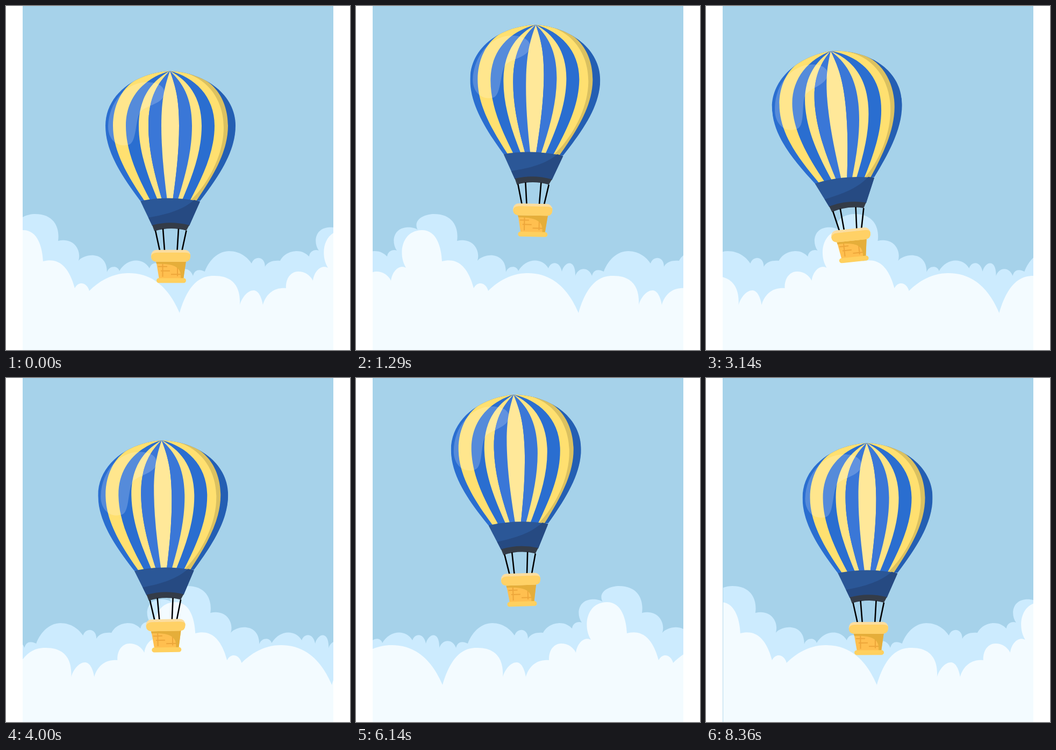
These frames come from a looping animation (640x640 px, 8430 ms). An HTML page:

```html
<!DOCTYPE html>
<html lang="en">
<head>
<meta charset="utf-8">
<title>Hot air balloon</title>
<style>
  html, body { margin: 0; height: 100%; overflow: hidden; background: #fff; }
  svg { display: block; width: 100%; height: 100%; }
</style>
</head>
<body>
<svg viewBox="0 0 640 640">
  <defs>
    <clipPath id="stage"><rect x="31" width="578" height="640"/></clipPath>
    <clipPath id="hull"><path id="hullShape"/></clipPath>
    <path id="back" fill="#ccebfe" d="M369 494C378 470 396 456 414 456C434 456 448 467 456 479C461 464 481 465 481 485
      C486 475 498 473 509 474C517 459 532 456 540 456C551 456 558 461 563 466C564 456 574 452 581 455
      C571 441 573 415 598 412C607 411 615 413 619.5 416C610 396 635 387 650 387C690 387 696 418 693 437
      C722 430 737 454 731 474C742 460 784 455 784 495C788 483 804 482 807 493C820 470 850 466 863 488
      C867 475 884 473 888 494C893 474 914 470 913 502C919 485 938 485 944 502C947 490 956 489 966 494V650H300Z"/>
    <path id="front" fill="#f3fbff" d="M322 571C338 515 362 502 385 502C424 501 436 526 434 556C439 540 450 529 460 529
      C469 529 475 543 477 556C482 538 496 523 520 525C519 507 529 494 543 494C556 494 566 502 570 511
      C573 492 586 481 598 487C583 463 589 418 627 417C655 416 664 449 665 475C703 465 717 500 724 525
      C733 509 748 517 751 530C774 507 800 497 823 497C880 496 906 541 919 571V650H290Z"/>
  </defs>
  <g clip-path="url(#stage)">
    <rect width="640" height="640" fill="#a6d2ea"/>
    <g id="clouds"></g>
    <g id="balloon">
      <g clip-path="url(#hull)">
        <rect x="180" y="110" width="250" height="260" fill="#2a6ed0"/>
        <g id="stripes"></g>
        <path fill="#000" opacity=".14" d="M309 119C370 124 405 170 405 225C405 280 372 335 342 362L440 370V110Z"/>
        <path fill="#fff" opacity=".2" d="M190 222C192 176 225 141 262 141C285 141 297 151 295 164C289 182 262 184 251 195
          C240 207 244 252 229 257C205 264 189 245 190 222Z"/>
      </g>
      <path fill="#2b5797" d="M250 362Q305 351 361 363L341 408H272Z"/>
      <path fill="#264a82" d="M265 393C300 387 330 378 350 360L361 363L341 408H272Z"/>
      <path fill="#343c48" d="M272 407Q306 398 341 407L335.500 417Q306 409 276 418Z"/>
      <path stroke="#000" stroke-width="2.6" d="M278 417L286 454M292 413.500L295 454M321 413.500L318.500 454M335.500 417L327.500 454"/>
      <path fill="#ffbf4f" d="M279 472H335L330 508H285Z"/>
      <path fill="none" stroke="#eda63a" stroke-width="2" d="M283 484H300M288 492H305M307 498.500H327M291.500 478V503M319 486V502"/>
      <path fill="#e5ae3a" d="M279 474H335L330 507H325C327 488 318 478 280 479Z"/>
      <rect x="270" y="453" width="73" height="22" rx="10" fill="#fbdda0"/>
      <path fill="#ffd166" d="M270 465Q272 458 281 458H333Q341 458 343 462V465Q343 475 333 475H281Q270 475 270 465Z"/>
      <rect x="280" y="505.500" width="55" height="9" rx="4.500" fill="#ffd05f"/>
    </g>
  </g>
</svg>
<script>
const FPS = 14, LOOP = 8430, TILE = 597;
const $ = id => document.getElementById(id);

// One side of a stripe: from the apex over the widest point down to the skirt.
// Inner stripes leave the apex more steeply.
const side = (wide, low) => {
  const steep = 1 - Math.abs(wide - 305) / 120;
  return [
    [305, 120], [305 + (wide - 305) * .55, 124 + 26 * steep], [wide, 165 + 5 * steep], [wide, 222],
    [wide, 270], [wide + (low - wide) * .47, 316], [low, 362]
  ];
};
const panel = (left, right) => {
  const curve = p => `C${p.slice(1, 4)}C${p.slice(4)}`;
  return `M${left[0]}${curve(left)}L${right[6]}${curve([...right].reverse())}Z`;
};
$('hullShape').setAttribute('d', panel(side(185, 250), side(427, 361)));

const outer = (wide, low, top) => {
  const p = side(wide, low);
  p[1] = [top, 120];
  p[2] = [wide, 175];
  return p;
};
const stripes = [
  ['#ffe070', outer(199, 258, 225), side(223, 269)],
  ['#ffe484', side(247, 283), side(265, 291)],
  ['#3a77d7', side(265, 291), side(289, 300)],
  ['#ffe899', side(289, 300), side(322, 310)],
  ['#3a77d7', side(322, 310), side(346, 319)],
  ['#ffe484', side(346, 319), side(364, 327)],
  ['#ffe070', side(388, 342), outer(413, 354, 387)]
];
$('stripes').innerHTML = stripes.map(([fill, l, r]) => `<path fill="${fill}" d="${panel(l, r)}"/>`).join('');

const row = id => [-2, -1, 0].map(k => `<use href="#${id}" x="${k * TILE}"/>`).join('');
// The cloud strip ends where the sky rectangle begins
$('clouds').innerHTML = row('back') + row('front') +
  '<rect x="-640" y="380" width="79" height="270" fill="#a6d2ea"/>';

// Flight path: step, apex x, apex y, tilt in degrees
const keys = [
  [0, 305, 121, 0], [6, 348, 97, 2.7], [12, 368, 52, 4.8], [18, 334.5, 35, 1.2],
  [24, 298, 30, -1.6], [36, 239, 48, -6.4], [44, 232, 84, -6], [56, 289.5, 116, -1],
  [60, 312, 118, .4], [66, 352, 95, 3], [72, 370, 55, 5], [84, 304, 32, -1],
  [96, 242, 35, -6.3], [99, 236, 44, -6.7], [108, 246, 89, -5], [117, 299, 121, -.3]
];
const STEPS = 118, n = keys.length;
const key = i => {
  const lap = Math.floor(i / n), k = keys[i - lap * n];
  return [k[0] + lap * STEPS, ...k.slice(1)];
};

function pose(step) {
  let i = n - 1;
  while (keys[i][0] > step) i--;
  const [p, a, b, q] = [-1, 0, 1, 2].map(d => key(i + d));
  const span = b[0] - a[0], u = (step - a[0]) / span;
  return [1, 2, 3].map(c => {
    const ma = (b[c] - p[c]) / (b[0] - p[0]) * span;
    const mb = (q[c] - a[c]) / (q[0] - a[0]) * span;
    const d = b[c] - a[c];
    return a[c] + u * (ma + u * (3 * d - 2 * ma - mb + u * (ma + mb - 2 * d)));
  });
}

function draw(now) {
  const step = Math.min(STEPS - 1, Math.floor(now % LOOP * FPS / 1000 + .1));
  const [x, y, tilt] = pose(step);
  $('clouds').setAttribute('transform', `translate(${.9 + step * TILE / STEPS})`);
  $('balloon').setAttribute('transform', `translate(${x} ${y}) rotate(${tilt}) translate(-305 -120.2)`);
}

const start = performance.now();
(function tick() {
  draw(performance.now() - start);
  requestAnimationFrame(tick);
})();
</script>
</body>
</html>
```
